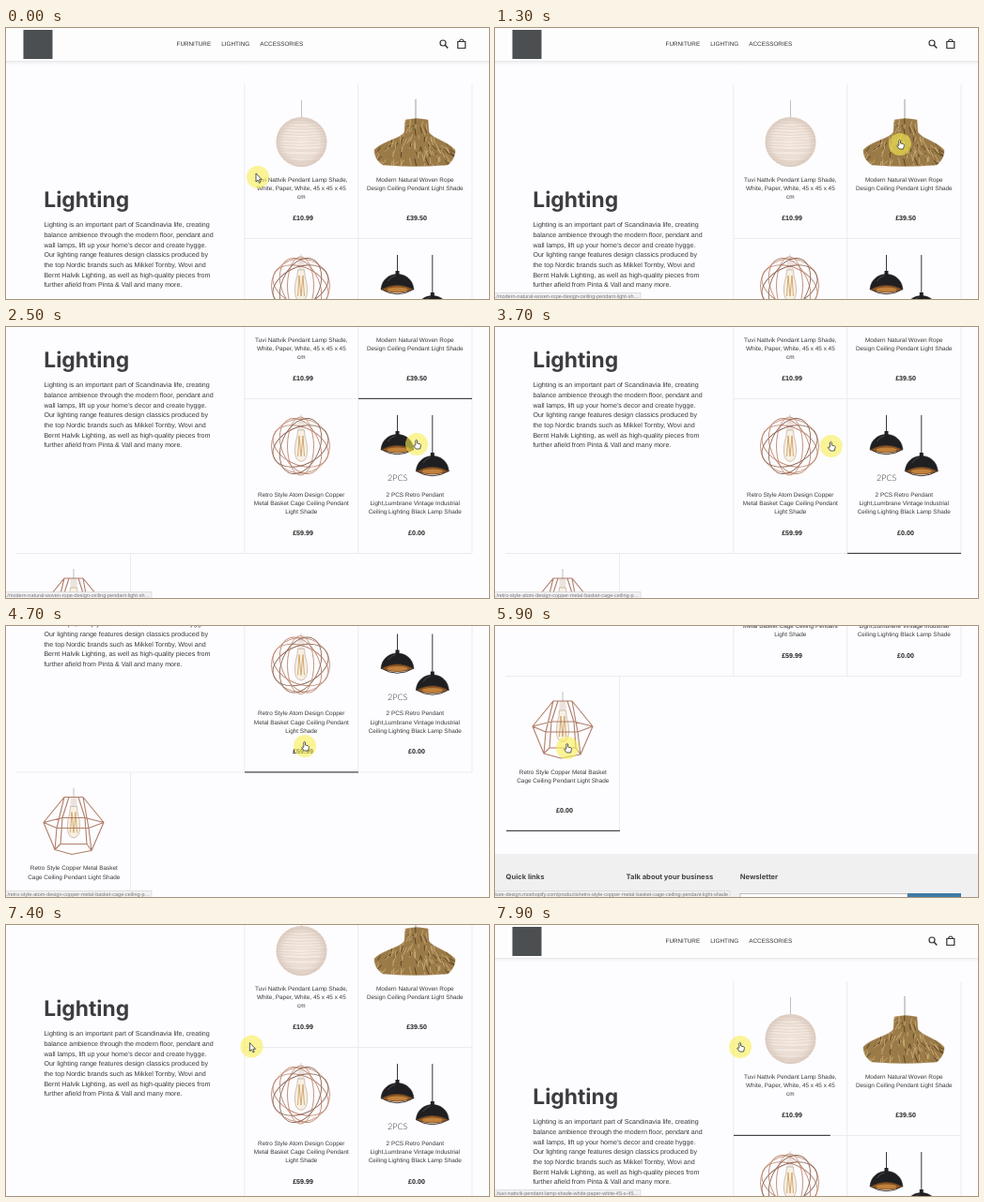
An HTML page that plays this animation: 514x289 px, repeating every 8000 ms.

```html
<!DOCTYPE html>
<html lang="en">
<head>
<meta charset="utf-8">
<title>Lighting shop page</title>
<style>
html, body { margin: 0; width: 100%; height: 100%; overflow: hidden; background: #fdfcfe; }
svg { display: block; width: 514px; height: 289px; font-family: "Liberation Sans", Arial, sans-serif; text-rendering: geometricPrecision; }
.head { font-family: Inter, sans-serif; font-weight: 650; }
</style>
</head>
<body>
<svg id="stage" viewBox="0 0 514 289"></svg>
<script>
const stage = document.getElementById('stage');
const text = (x, y, s, size, fill = '#333', more = '') =>
  `<text x="${x}" y="${y}" font-size="${size}" fill="${fill}" ${more}>${s}</text>`;
const rect = (x, y, w, h, fill, more = '') =>
  `<rect x="${x}" y="${y}" width="${w}" height="${h}" fill="${fill}" ${more}/>`;
const path = (d, stroke, width = 1, fill = 'none', more = '') =>
  `<path d="${d}" stroke="${stroke}" stroke-width="${width}" fill="${fill}" ${more}/>`;
const ellipse = (x, y, rx, ry, fill, more = '') =>
  `<ellipse cx="${x}" cy="${y}" rx="${rx}" ry="${ry}" fill="${fill}" ${more}/>`;

let seed = 7;
const rand = (a, b) => {
  seed = (seed * 16807) % 2147483647;
  return a + (b - a) * seed / 2147483647;
};

const cells = [
  { x: 254, y: 60, price: '£10.99', lines: ['Tuvi Nattvik Pendant Lamp Shade,', 'White, Paper, White, 45 x 45 x 45', 'cm'] },
  { x: 375, y: 60, price: '£39.50', lines: ['Modern Natural Woven Rope', 'Design Ceiling Pendant Light Shade'] },
  { x: 254, y: 225, price: '£59.99', lines: ['Retro Style Atom Design Copper', 'Metal Basket Cage Ceiling Pendant', 'Light Shade'] },
  { x: 375, y: 225, price: '£0.00', lines: ['2 PCS Retro Pendant', 'Light,Lumbrane Vintage Industrial', 'Ceiling Lighting Black Lamp Shade'] },
  { x: 12, y: 390, price: '£0.00', lines: ['Retro Style Copper Metal Basket', 'Cage Ceiling Pendant Light Shade'] }
];

const intro = [
  'Lighting is an important part of Scandinavia life, creating',
  'balance ambience through the modern floor, pendant and',
  'wall lamps, lift up your home’s decor and create hygge.',
  'Our lighting range features design classics produced by',
  'the top Nordic brands such as Mikkel Tornby, Wovi and',
  'Bernt Halvik Lighting, as well as high-quality pieces from',
  'further afield from Pinta &amp; Vall and many more.'
];

function paperLamp() {
  let s = path('M314.5 77V96', '#999', .6) + ellipse(314.5, 121.5, 27, 26.5, 'url(#paper)');
  for (let y = 98; y < 147; y += 3) {
    const w = Math.sqrt(Math.max(0, 1 - ((y - 121.5) / 26.5) ** 2)) * 27;
    s += path(`M${314.5 - w} ${y}q${w} ${rand(0, 4)} ${2 * w} ${rand(-1, 1)}`, '#d3c1b4', .45);
  }
  return s;
}

function ropeLamp() {
  const shape = 'M425 98Q437 95 449 98L450 111C454 118 470 121 478 130C478 137 475 142 470 146Q436 149 401 146C395 142 392 137 392 130C400 121 420 118 424 111Z';
  let s = `<clipPath id="rope"><path d="${shape}"/></clipPath>` +
    path('M436 76V97', '#777', .7) + path(shape, '#a38352', .4, '#9a7a47') + '<g clip-path="url(#rope)">';
  for (let i = 0; i < 170; i++) {
    const x = rand(390, 480), y = rand(94, 146);
    const lean = (x - 436) * .12 + rand(-3, 3);
    s += path(`M${x} ${y}l${lean} ${rand(4, 9)}`, i % 3 ? '#d0b079' : '#4d391d', .8);
  }
  return s + '</g>';
}

const bulb = (x, y) => rect(x - 3.5, y - 10, 7, 10, '#ece3df') +
  path(`M${x - 3.5} ${y}h7q0 6 2.5 14q2 14 -2.5 18q-3.5 3 -7 0q-4.5 -4 -2.5 -18q2.5 -8 2.5 -14z`, '#b49f88', .6, '#f8f0e4') +
  path(`M${x - 3.5} ${y + 28}l1.5 -22 2 22 2 -22 1.5 22`, '#c99a55', .8);

function atomLamp() {
  let s = bulb(314, 258) + path('M314 241V250', '#ccc', .8);
  for (const [angle, ry] of [[0, 29], [24, 20], [-24, 20], [66, 20], [-66, 20], [90, 14]])
    s += ellipse(313.5, 275, 31, ry, 'none', `stroke="${angle < 0 ? '#8f6a58' : '#bd8a72'}" stroke-width=".9" transform="rotate(${angle} 313.5 275)"`);
  return s;
}

const dome = (x, y) => path(`M${x} 242V${y}`, '#222', .9) + rect(x - 2, y - 3, 4, 5, '#222') +
  ellipse(x, y + 15.5, 16.5, 5, '#8a5424') +
  ellipse(x, y + 17, 11, 2.6, '#c0823c') +
  path(`M${x - 17.5} ${y + 17}C${x - 16} ${y - 5} ${x + 16} ${y - 5} ${x + 17.5} ${y + 17}Q${x} ${y + 7} ${x - 17.5} ${y + 17}Z`, '#1c1c1e', .5, '#1f1f22') +
  path(`M${x - 17.5} ${y + 16.5}Q${x} ${y + 27} ${x + 17.5} ${y + 16.5}`, '#2a2220', .9) +
  path(`M${x - 10} ${y + 8}q3 -5 8 -6`, '#55555a', .8);

const diamondLamp = () => bulb(72, 426) + path('M72 406V417', '#ddd', 2) +
  path('M62 416H82L104 443L91 473L70 477L52 472L40 443ZM62 416L54 449L52 472M82 416L88 449L91 473M40 443L54 449H88L104 443M40 443L60 438H84L104 443M67 416L60 438L58 466M77 416L84 438L86 466M52 472L58 466H86L91 473', '#b07f6b', 1.1, 'none', 'stroke-linejoin="round"');

function header() {
  return rect(0, 0, 514, 36, '#fefdfe') + rect(0, 35, 514, 1, '#e9e8ea') + rect(0, 36, 514, 4, 'url(#shade)') +
    rect(18.5, 2, 31, 31, '#4c4f52') +
    text(181.5, 19, 'FURNITURE', 6.35) + text(229.3, 19, 'LIGHTING', 6.35) + text(270.3, 19, 'ACCESSORIES', 6.35) +
    `<circle cx="465" cy="16" r="3" fill="none" stroke="#333" stroke-width="1.2"/>` +
    path('M467.2 18.3L470.3 21.5', '#333', 1.5) +
    path('M480.8 14.5H488.8V21.5H480.8ZM482.7 14.5V13.5Q484.8 10.5 486.9 13.5V14.5', '#333', 1.2);
}

function product(c) {
  return c.lines.map((s, i) => text(c.x + 60.3, c.y + 103.6 + i * 9.4, s, 6.4, '#3a3a3a', 'text-anchor="middle"')).join('') +
    text(c.x + 62, c.y + 144.6, c.price, 7.1, '#222', 'text-anchor="middle" font-weight="bold"');
}

function footer() {
  const title = (x, s) => text(x, 605.8, s, 7.6, '#444', 'class="head"');
  return rect(0, 579, 514, 200, '#f0f0f1') + title(11.6, 'Quick links') +
    title(139.5, 'Talk about your business') + title(260.7, 'Newsletter') +
    rect(261, 621.5, 178, 18, '#fdfdfd', 'stroke="#aaa" stroke-width=".7"') + rect(439, 621, 57, 19, '#3f7ba6');
}

const grid = path('M253.8 60V389.5M374.8 60V389.5M496 60V389.5M254 224.5H496M11 389.5H496M132.5 389.5V554.5', '#ebe9ec', .9);

stage.innerHTML = `<defs>
  <radialGradient id="paper"><stop offset="0" stop-color="#f8eee6"/><stop offset=".7" stop-color="#f0e4db"/><stop offset="1" stop-color="#dccbc0"/></radialGradient>
  <linearGradient id="shade" x2="0" y2="1"><stop stop-color="#f1f0f2"/><stop offset="1" stop-color="#fdfcfe"/></linearGradient>
</defs>
${rect(0, 0, 514, 289, '#fdfcfe')}
<g id="page">
  ${header()}
  ${text(40.3, 191, 'Lighting', 22.8, '#3d3d40', 'class="head"')}
  ${intro.map((s, i) => text(40.4, 212.4 + i * 10.67, s, 7.1, '#383838')).join('')}
  ${grid}${cells.map(product).join('')}
  ${paperLamp()}${ropeLamp()}${atomLamp()}${dome(416.5, 262)}${dome(453.8, 285)}${diamondLamp()}
  ${text(406, 312, '2PCS', 9, '#333', 'font-family="Lato, sans-serif" font-weight="300"')}
  ${footer()}
  ${cells.map(c => rect(c.x, c.y + 163.8, 0, 1.2, '#47424a', 'class="bar"')).join('')}
</g>
<g id="status">${rect(-1, 282.5, 10, 8, '#f1f1f2', 'stroke="#cfcfd2" stroke-width=".6"')}${text(0, 288.4, '', 5.5, '#77777a', 'text-anchor="end"')}</g>
<g id="cursor">
  <circle r="12" fill="#f9ef50" opacity=".6"/>
  ${path('M-2 -4V5L0 3.2L1.5 6.3L2.8 5.7L1.4 2.7H4.2Z', '#333', .8, '#fff', 'id="arrow"')}
  ${path('M-1.2 1V-4Q-.3 -5.5 .6 -4V-1L3.7 -.2Q4.6 .2 4.4 1.5L3.6 5H-.8L-3.4 1.6Q-3 .2 -1.2 1.8', '#333', .8, '#fff', 'id="hand"')}
</g>`;

const urls = {
  paper: './tuvi-nattvik-pendant-lamp-shade-white-paper-white-45-x-45…',
  rope: './modern-natural-woven-rope-design-ceiling-pendant-light-sh…',
  domes: './2-pcs-retro-pendant-light-lumbrane-vintage-industrial-ce…',
  atom: './retro-style-atom-design-copper-metal-basket-cage-ceiling-p…',
  diamond: 'iture-design.moshopify.com/products/retro-style-copper-metal-basket-cage-ceiling-pendant-light-shade'
};
const hovers = [[0, ''], [300, 'paper'], [1200, 'rope'], [2700, 'domes'], [3700, 'atom'],
  [5400, ''], [5600, 'diamond'], [6300, ''], [7600, 'paper']];
const scrolls = [[0, 0], [1800, 0], [2500, 148], [4400, 148], [4700, 233.5], [5200, 336],
  [6400, 336], [6900, 218], [7100, 188], [7200, 188], [7600, 0]];
const moves = [[0, 268, 159], [400, 395, 92], [700, 437, 111], [1000, 437, 111], [1300, 431, 124],
  [1700, 437, 125], [3300, 437, 125], [3900, 318, 128], [5300, 318, 128], [5800, 77, 130],
  [6200, 77, 130], [6700, 262, 129], [7900, 261, 130]];
// Start of growth and of retreat of the line under each cell.
const bars = [[7560, 9000], [1300, 2700], [3800, 4900], [2800, 3700], [5500, 6300]];

const clamp = v => Math.max(0, Math.min(1, v));
function at(keys, t, n = 1) {
  const i = keys.findIndex(k => k[0] > t);
  if (i < 0) return keys[keys.length - 1][n];
  const a = keys[i - 1], b = keys[i];
  return a[n] + (b[n] - a[n]) * (t - a[0]) / (b[0] - a[0]);
}

const find = s => stage.querySelector(s);
const page = find('#page'), cursor = find('#cursor'), arrow = find('#arrow'), hand = find('#hand');
const status = find('#status'), label = find('#status text'), panel = find('#status rect');
const barNodes = stage.querySelectorAll('.bar');

function draw(now) {
  const t = Math.floor(now % 8000 / 100) * 100;
  page.setAttribute('transform', `translate(0 ${-at(scrolls, t)})`);
  cursor.setAttribute('transform', `translate(${at(moves, t)} ${at(moves, t, 2)})`);
  const hover = hovers.filter(h => h[0] <= t).pop()[1];
  arrow.style.display = hover ? 'none' : '';
  hand.style.display = status.style.display = hover ? '' : 'none';
  const width = hover === 'diamond' ? 250 : 155;
  panel.setAttribute('width', width + 1);
  label.setAttribute('x', width - 2);
  label.textContent = urls[hover] || '';
  bars.forEach(([grow, leave], i) =>
    barNodes[i].setAttribute('width', 121 * clamp((t - grow) / 400) * (1 - clamp((t - leave) / 400))));
  requestAnimationFrame(() => draw(performance.now() - start));
}
const start = performance.now();
draw(0);
</script>
</body>
</html>
```
